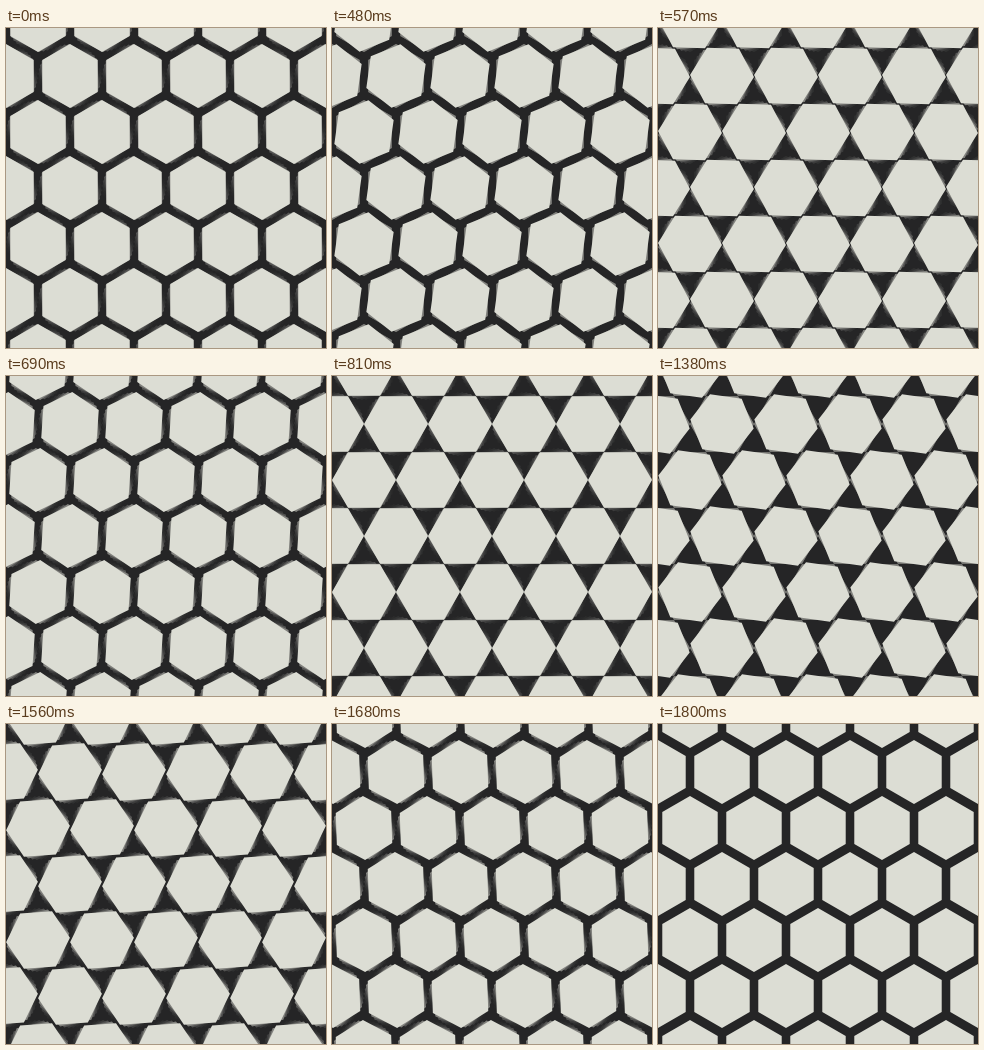
These frames come from a looping animation (320 by 320 pixels, 1.83 s). An HTML page with a canvas:

```html
<!DOCTYPE html>
<html lang="en">
<head>
<meta charset="utf-8">
<title>Turning hexagons</title>
<style>
  html, body { margin: 0; width: 100%; height: 100%; overflow: hidden; background: #252526; }
  canvas { display: block; width: 320px; height: 320px; }
</style>
</head>
<body>
<canvas id="stage" width="320" height="320"></canvas>
<script>
const ctx = document.getElementById('stage').getContext('2d');
const LOOP = 1830, STEP = 30;
const RADIUS = 32, COLUMN = 64, ROW = 56;
const DARK = [37, 37, 38], LIGHT = [220, 221, 212];
const SPEED = 8, TURN = 90, DECAY = 0.5, TRAIL = 6;

// Each turn starts at a tick and runs at constant speed until it stops.
const turns = [
  { start: -12, from: -90 },
  { start: 15, from: 0 },
  { start: 45, from: 90 }
];

const mix = amount =>
  `rgb(${DARK.map((c, i) => Math.round(c + (LIGHT[i] - c) * amount)).join()})`;

function angleAt(turn, tick) {
  const moved = Math.max(0, tick - turn.start) * SPEED;
  return turn.from + Math.min(TURN, moved);
}

function drawHexagons(degrees, color) {
  const corners = Array.from({ length: 6 }, (_, i) => {
    const a = (degrees - 90 + i * 60) * Math.PI / 180;
    return [RADIUS * Math.cos(a), RADIUS * Math.sin(a)];
  });
  ctx.fillStyle = color;
  ctx.beginPath();
  for (let row = -1; row < 6; row++) {
    const y = 48 + row * ROW;
    const shift = row % 2 ? COLUMN / 2 : 0;
    for (let col = -1; col < 7; col++) {
      const x = col * COLUMN + shift;
      corners.forEach(([dx, dy], i) => ctx[i ? 'lineTo' : 'moveTo'](x + dx, y + dy));
      ctx.closePath();
    }
  }
  ctx.fill();
}

function draw(time) {
  const tick = Math.floor((time % LOOP) / STEP);
  const turn = turns.filter(t => t.start <= tick).pop();
  const resting = (tick >= 2 && tick < 16) || (tick >= 32 && tick < 46) || tick >= 60;

  ctx.fillStyle = mix(0);
  ctx.fillRect(0, 0, 320, 320);
  for (let age = resting ? 0 : TRAIL; age >= 0; age--) {
    drawHexagons(angleAt(turn, tick - age), mix(DECAY ** age));
  }
}

function play(now) {
  draw(now);
  requestAnimationFrame(play);
}
draw(0);
requestAnimationFrame(play);
</script>
</body>
</html>
```
